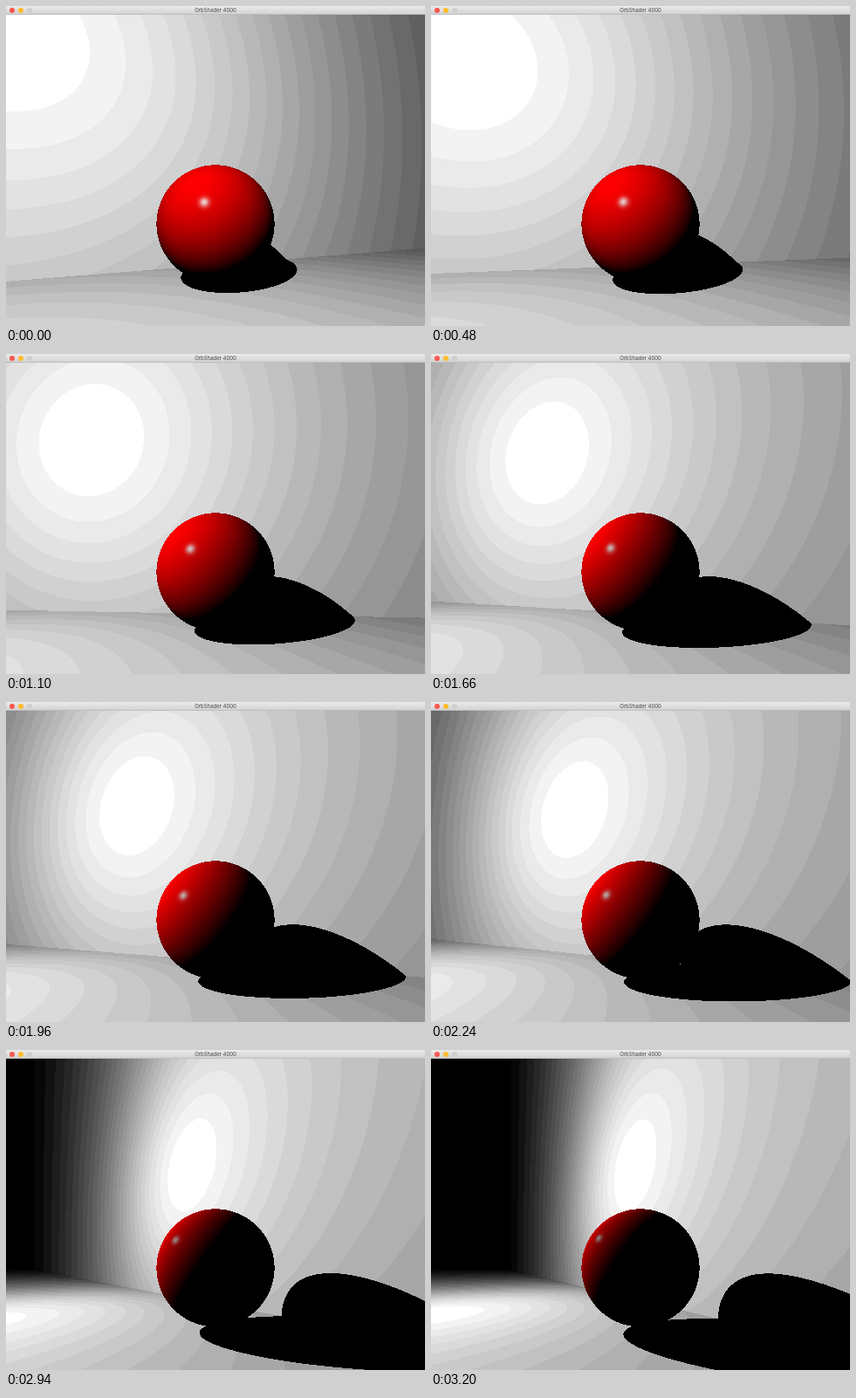
Recreate the animation shown at these times as an HTML page with a canvas. Size 480 by 367 pixels, loop 3220 ms.

```html
<!DOCTYPE html>
<html lang="en">
<head>
<meta charset="utf-8">
<title>OrbShader 4000</title>
<style>
  html, body { margin: 0; width: 480px; height: 367px; overflow: hidden; background: #000; }
  .bar {
    position: absolute; left: 0; top: 0; width: 480px; height: 10px; box-sizing: border-box;
    background: linear-gradient(#ebebeb, #d3d3d3); border-bottom: 1px solid #bdbdbd;
    font: 6px/10px Inter, Roboto, "Liberation Sans", sans-serif; color: #484848; text-align: center;
  }
  .dot { position: absolute; top: 2px; width: 6px; height: 6px; border-radius: 50%; }
  canvas { position: absolute; left: 0; top: 10px; display: block; }
</style>
</head>
<body>
<div class="bar">
  <span class="dot" style="left:3.5px;background:#fc5650"></span>
  <span class="dot" style="left:13.5px;background:#fdbb2e"></span>
  <span class="dot" style="left:23.5px;background:#cfcfcf"></span>
  OrbShader 4000
</div>
<canvas id="view" width="480" height="357"></canvas>
<script>
const WIDTH = 480, HEIGHT = 357, LOOP = 3220, STEP = 20;
const FOCAL = 240, HORIZON = 242;   // in canvas pixels
const ORBIT = 3.69;                 // camera to ball, ball radius is 1
const BALL_Y = 0.03;
const FLOOR = 1.085;                // camera height above the floor
const WALL = 1.95;                  // ball to wall
const LIGHT = { along: -3.8, up: 3.83, front: 3.9 };
const LEVELS = 28, SHINE = 320, GAMMA = 0.9;

// [step, camera angle in degrees]
const ORBIT_KEYS = [[0, -23], [24, -11.3], [55, 5.6], [83, 17], [112, 28.8], [135, 40.6], [160, 58.3]];

const ctx = document.getElementById('view').getContext('2d');
const image = ctx.createImageData(WIDTH, HEIGHT);
const pixels = new Uint32Array(image.data.buffer);
const rgb = (r, g, b) => (0xff000000 | b << 16 | g << 8 | r) >>> 0;
const tone = v => Math.round(255 * Math.pow(Math.min(1, v), GAMMA));
const BLACK = rgb(0, 0, 0);

const grays = Array.from({ length: LEVELS + 1 }, (_, k) => {
  const v = k >= LEVELS - 1 ? 255 : tone((k + 0.5) / LEVELS);
  return rgb(v, v, v);
});

function angleAt(step) {
  let i = 1;
  while (i < ORBIT_KEYS.length - 1 && step > ORBIT_KEYS[i][0]) i++;
  const [s0, a0] = ORBIT_KEYS[i - 1], [s1, a1] = ORBIT_KEYS[i];
  return (a0 + (a1 - a0) * (step - s0) / (s1 - s0)) * Math.PI / 180;
}

function render(step) {
  const angle = angleAt(step), sin = Math.sin(angle), cos = Math.cos(angle);
  const lx = -LIGHT.front * sin + LIGHT.along * cos;
  const ly = LIGHT.up;
  const lz = ORBIT - LIGHT.front * cos - LIGHT.along * sin;
  const wallDist = WALL + ORBIT * cos;
  const bx = -lx, by = BALL_Y - ly, bz = ORBIT - lz;   // light to ball
  const ballDist2 = bx * bx + by * by + bz * bz;
  const centre2 = BALL_Y * BALL_Y + ORBIT * ORBIT;

  function ballColor(dx, dy, t, len2) {
    const nx = t * dx, ny = t * dy - BALL_Y, nz = t - ORBIT;
    let x = lx - t * dx, y = ly - t * dy, z = lz - t;
    const dist = Math.sqrt(x * x + y * y + z * z);
    x /= dist; y /= dist; z /= dist;
    const lit = nx * x + ny * y + nz * z;
    if (lit <= 0) return BLACK;
    // highlight from the half vector between light and eye
    const len = Math.sqrt(len2);
    const hx = x - dx / len, hy = y - dy / len, hz = z - 1 / len;
    const half = (nx * hx + ny * hy + nz * hz) / Math.sqrt(hx * hx + hy * hy + hz * hz);
    const spec = 0.9 * Math.pow(Math.max(0, half), SHINE);
    const white = tone(lit * spec);
    return rgb(tone(lit), white, white);
  }

  function planeColor(dx, dy) {
    const slope = dx * sin + cos;
    const tWall = slope > 1e-6 ? wallDist / slope : Infinity;
    const tFloor = dy < 0 ? -FLOOR / dy : Infinity;
    const t = Math.min(tWall, tFloor);
    if (t === Infinity) return BLACK;
    const x = t * dx - lx, y = t * dy - ly, z = t - lz;
    const dist2 = x * x + y * y + z * z;
    const toward = x * bx + y * by + z * bz;
    // shadow: the ray from the light passes within one radius of the ball
    if (toward > 0 && ballDist2 - toward * toward / dist2 < 1) return BLACK;
    const facing = tWall < tFloor ? x * sin + z * cos : -y;
    return grays[Math.max(0, Math.floor(LEVELS * facing / Math.sqrt(dist2)))];
  }

  let p = 0;
  for (let row = 0; row < HEIGHT; row++) {
    const dy = (HORIZON - row - 0.5) / FOCAL;
    for (let col = 0; col < WIDTH; col++) {
      const dx = (col + 0.5 - WIDTH / 2) / FOCAL;
      const len2 = dx * dx + dy * dy + 1;
      const b = dy * BALL_Y + ORBIT;
      const disc = b * b - len2 * (centre2 - 1);
      pixels[p++] = disc > 0
        ? ballColor(dx, dy, (b - Math.sqrt(disc)) / len2, len2)
        : planeColor(dx, dy);
    }
  }
  ctx.putImageData(image, 0, 0);
}

let shown = -1;
function tick() {
  const step = Math.floor(performance.now() % LOOP / STEP);
  if (step !== shown) render(shown = step);
  requestAnimationFrame(tick);
}
tick();
</script>
</body>
</html>
```
